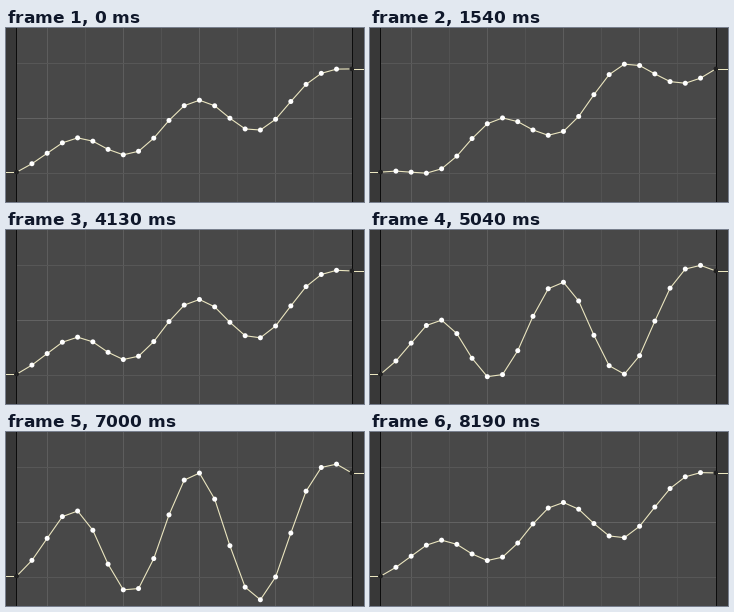
A matplotlib script for the animation above (8.26 s loop, 358 by 174 pixels).

```python
import numpy as np
import matplotlib.pyplot as plt
from matplotlib.animation import FuncAnimation
from matplotlib.patches import Circle, Rectangle

W, H, DPI = 358, 174, 100
FRAMES, STEP = 118, 70
LEFT, GAP, LAST = 10.7, 15.23, 22
LOW, HIGH = -1, 3
CREAM = "#ebe6c0"

k = np.arange(LAST + 1)
x = LEFT + GAP * k
line = 144.1 - 4.69 * k

# the wave is a sum of sines that vanish at both end keys
HARMONICS = (-5.4, 9, -3.4, 5.3, 14.6, -7.2, -3, -.4, -.8)
swing = sum(a * np.sin(np.pi * n * k / LAST)
            for n, a in enumerate(HARMONICS, 1))


def ease(t, lift):
    """Nearly linear, slowing down towards the end."""
    t = np.clip(t, 0, 1)
    return t + t * (1 - t) * (lift + t / 3)


def strength(i):
    """Rise from LOW to HIGH, hold, then fall across the loop's seam."""
    if 22 <= i < 100:
        return LOW + (HIGH - LOW) * ease((i - 37) / 47, .15)
    return HIGH - (HIGH - LOW) * ease((i - 100) % FRAMES / 40, .05)


fig = plt.figure(figsize=(W / DPI, H / DPI), dpi=DPI, facecolor="#383838")
ax = fig.add_axes([0, 0, 1, 1])
ax.set_xlim(0, W)
ax.set_ylim(H, 0)
ax.axis("off")


def bar(px, py, w, h, color, z=1):
    ax.add_patch(Rectangle((px, py), w, h, color=color, lw=0,
                           antialiased=False, zorder=z))


def dot(px, py, r, color):
    return ax.add_patch(Circle((px, py), r, color=color, lw=0, zorder=4))


bar(11, 0, 335, H, "#484848", 0)
for j in range(8):
    bar(int(LEFT + GAP * (2 + 2.5 * j)), 0, 1, H,
        "#525252" if j % 2 else "#5d5d5d")
for j in range(3):
    bar(11, 35 + 55 * j, 335, 1, "#626262" if j == 1 else "#575757")
for edge in (10, 346):
    bar(edge, 0, 1, H, "#0c0c0c", 2)

# flat extrapolation outside the end keys
bar(0, 144, 8, 1, CREAM, 3)
bar(348, 41, 10, 1, CREAM, 3)

curve, = ax.plot(x, line, color=CREAM, lw=1.1 * 72 / DPI, zorder=3)
for end in (0, LAST):
    dot(x[end], line[end], 2.3, "#202020")
dots = [dot(px, py, 2.5, "white") for px, py in zip(x[1:-1], line[1:-1])]


def draw(i):
    y = line - strength(i) * swing
    curve.set_ydata(y)
    for d, px, py in zip(dots, x[1:-1], y[1:-1]):
        d.center = px, py
    return [curve, *dots]


anim = FuncAnimation(fig, draw, frames=FRAMES, interval=STEP, repeat=True,
                     repeat_delay=0)
plt.show()
```
